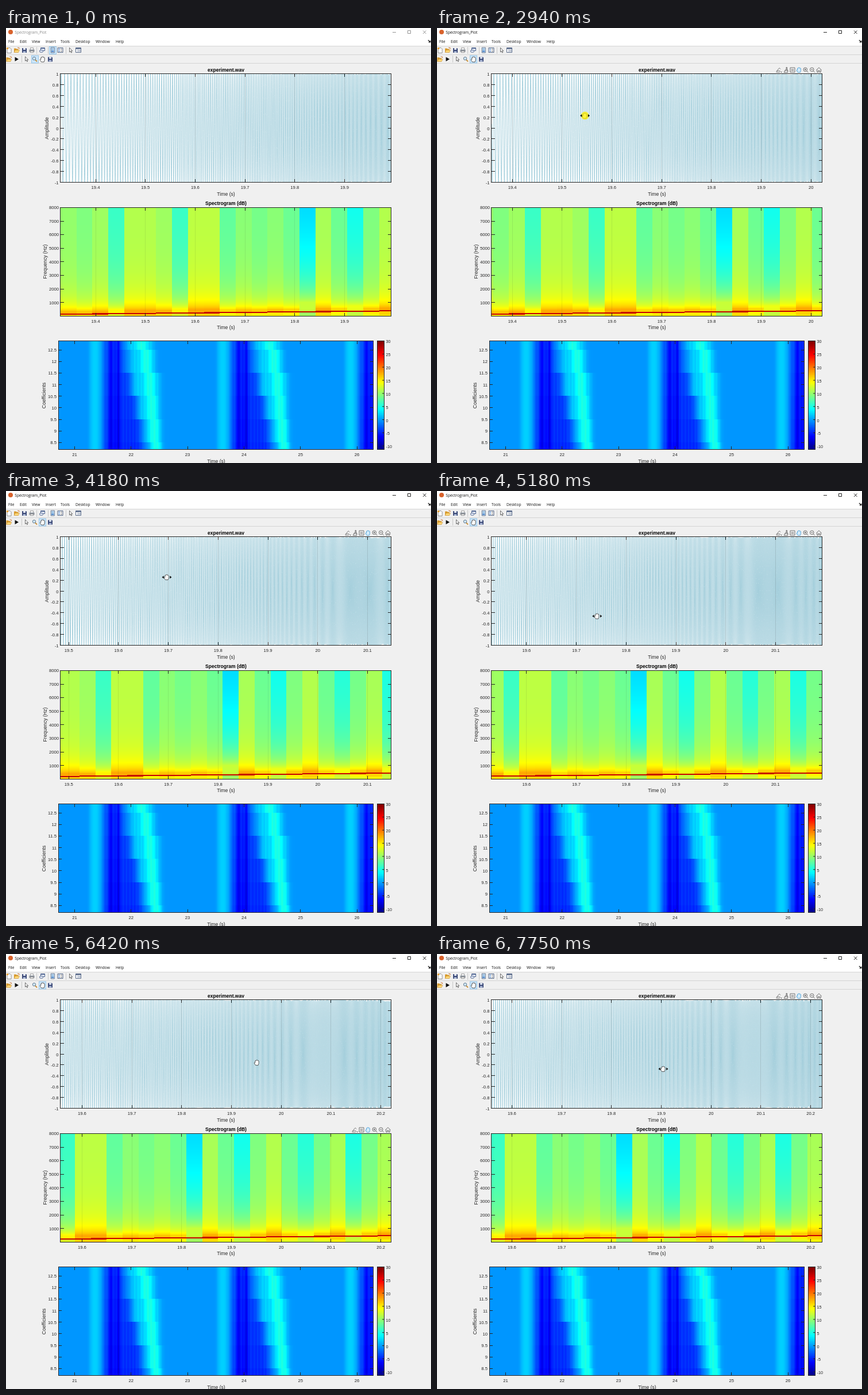
An HTML page with a canvas that plays this animation: 740 by 757 pixels, repeating every 8000 ms.

```html
<!DOCTYPE html>
<html lang="en">
<head>
<meta charset="utf-8">
<title>Spectrogram_Plot</title>
<style>
html, body { margin: 0; width: 100%; height: 100%; overflow: hidden; background: #f0f0f0; }
canvas, svg { position: absolute; left: 0; top: 0; width: 740px; height: 757px; }
.plot { font-family: "Liberation Sans", Arial, sans-serif; fill: #262626; }
.ui { font-family: "Open Sans", "Noto Sans", sans-serif; fill: #111; }
</style>
</head>
<body>
<canvas id="cv" width="740" height="757"></canvas>
<svg id="ui" viewBox="0 0 740 757" xmlns="http://www.w3.org/2000/svg">
  <defs>
    <g id="save"><path d="M-4-4H3L4-3V4H-4Z" fill="#3c4a78"/><path d="M-2-4H2V-1H-2Z" fill="#dfe6f5"/><path d="M-2.3 1.2H2.3V4H-2.3Z" fill="#aebbd8"/></g>
    <g id="folder"><path d="M-4.5 4V-3H-1L0-2H3V4Z" fill="#d99a2b"/><path d="M-4.5 4L-2.5 0H5L3 4Z" fill="#ffd877" stroke="#b9812a" stroke-width=".5"/><path d="M1.5-4.5L4.5-4V-2" fill="none" stroke="#c96a28" stroke-width=".9"/></g>
    <path id="arrow" d="M0 0V9.5L2.2 7.4 3.8 11 5.3 10.3 3.7 6.9H6.6Z" fill="#fff" stroke="#222" stroke-width=".8"/>
    <path id="hand" d="M-2.4 4.6L-4.8 .9Q-4.7-.6-3.2 .2V-3Q-2.4-4-1.7-3V-4Q-1-5-.2-4.1Q.6-5 1.4-4V-3Q2.4-4 3.1-2.8V1.6L2.1 4.6Z" fill="#fff" stroke="#333" stroke-width=".8"/>
    <g id="lens"><path d="M.8 .8L4 4" stroke="#c58a2e" stroke-width="1.8"/><circle cx="-1" cy="-1.2" r="2.7" fill="#cfe6f7" stroke="#5b7285" stroke-width=".9"/></g>
    <g id="magnify" fill="none" stroke="#606060" stroke-width=".9"><circle cx="-.7" cy="-.7" r="3.3"/><path d="M1.7 1.7L4.4 4.4M-2.4-.7H1"/></g>
    <g id="export" fill="none" stroke="#707070" stroke-width=".9"><path d="M-4 2.5L1-3.5 3.2-1.5M-4 2.5Q0-.5 3 2.5M-4.5 4H2"/><path d="M3.2 3H6L4.6 4.8Z" fill="#606060" stroke="none"/></g>
    <path id="brush" d="M.5-4.5H2V0H3.2V4.3H-3.2L-1.2 0H.5ZM-1.2 1H3" fill="none" stroke="#606060" stroke-width=".9"/>
    <path id="tip" d="M-4-4H4V4H-4ZM-2.3-1H2.3M-2.3 1.2H2.3" fill="none" stroke="#666" stroke-width=".9"/>
    <path id="home" d="M-4.6 .3L0-4.2 4.6 .3M-3.2-.6V4H-1V1H1V4H3.2V-.6" fill="none" stroke="#606060" stroke-width=".9"/>
    <g id="tools">
      <use href="#tip" x="619"/>
      <g transform="translate(630.5 0) scale(.92)"><path d="M-2.4 4.6L-4.8 .9Q-4.7-.6-3.2 .2V-3Q-2.4-4-1.7-3V-4Q-1-5-.2-4.1Q.6-5 1.4-4V-3Q2.4-4 3.1-2.8V1.6L2.1 4.6Z" fill="#d5ecfa" stroke="#3d9ad6" stroke-width=".9"/></g>
      <use href="#magnify" x="642"/><path d="M641.3-2.4V1" stroke="#606060" stroke-width=".9"/>
      <use href="#magnify" x="653.5"/><use href="#home" x="665"/>
    </g>
  </defs>

  <path d="M0 0H740V31H0Z" fill="#fff"/>
  <path d="M0 31.5H740M0 46.5H740M0 61.5H740" stroke="#d4d4d4"/>
  <path d="M53.5 33V45M73.5 33V45M104.5 33V45M27.5 48V60" stroke="#c8c8c8"/>
  <circle cx="8" cy="7" r="4" fill="#d8622c"/>
  <g id="caption">
    <text class="ui" id="name" x="15.3" y="9.6" font-size="6.7">Spectrogram_Plot</text>
    <path id="buttons" d="M673 7.5H679M699.5 4.5H704.5V9.5H699.5ZM726 4.5L731.5 10M731.5 4.5L726 10" fill="none" stroke-width=".9"/>
  </g>
  <path d="M735 21L738.5 24.5M738.8 21.8V24.8H735.6" fill="none" stroke="#111" stroke-width="1.1"/>
  <g fill="#cce6fa" stroke="#86bfe8" stroke-width=".8">
    <rect id="hlBar" x="75.5" y="32.5" width="12" height="13"/>
    <rect id="hlZoom" x="44.5" y="48" width="12" height="13"/>
    <rect id="hlHand" x="57.5" y="48" width="12" height="13"/>
  </g>

  <path d="M2-4H7L9-2V5H2Z" transform="translate(0 38.5)" fill="#fff" stroke="#777" stroke-width=".8"/>
  <circle cx="2.5" cy="35.5" r="1.8" fill="#e8a33a"/>
  <use href="#folder" x="18.5" y="38.5"/><use href="#save" x="32" y="39"/>
  <g transform="translate(45 38.5)"><path d="M-2.5-4H2.5V0H-2.5Z" fill="#fff" stroke="#777" stroke-width=".7"/><path d="M-4.5-1H4.5V3H-4.5Z" fill="#8c939c"/><path d="M-2.7 1.5H2.7V4.2H-2.7Z" fill="#eee" stroke="#666" stroke-width=".6"/></g>
  <g transform="translate(63 38.5)" fill="#e8eefa" stroke="#3e5584" stroke-width=".9"><path d="M-2.5-4H4.5V1H-2.5Z"/><path d="M-2.5-3H4.5"/><rect x="-4.5" y="0" width="6" height="3.6" rx="1.6"/></g>
  <g transform="translate(81.3 38.5)"><path d="M-3-4.5H3V4.5H-3Z" fill="#fff" stroke="#4c6485" stroke-width=".9"/><path d="M-2-3.5H2V3.5H-2Z" fill="#9dc4e6"/><path d="M-2 1H2V3.5H-2Z" fill="#5a8fd0"/></g>
  <g transform="translate(94.5 38.5)"><path d="M-4.5-4H4.5V4H-4.5Z" fill="#fff" stroke="#4c5f80"/><path d="M-3-1.7H-.7M-3 1.7H-.7" stroke="#2f6fc0" stroke-width="1.5"/><path d="M.5-1.7H3.3M.5 1.7H3.3" stroke="#555"/></g>
  <use href="#arrow" transform="translate(110.5 34.3) scale(.8)"/>
  <g transform="translate(126 38.5)"><path d="M-4.5-4H4.5V4H-4.5Z" fill="#fff" stroke="#4c5f80" stroke-width=".9"/><path d="M-4.5-4H4.5V-2H-4.5Z" fill="#4c5f80"/><path d="M-1-2V4M0 0H4M0 2H4" stroke="#7d8ca6" stroke-width=".8"/></g>
  <use href="#folder" x="5" y="54.3"/><path d="M15.5 50.5L22 54.3 15.5 58Z" fill="#111"/>
  <use href="#arrow" transform="translate(33.5 49.8) scale(.8)"/>
  <use href="#lens" x="50" y="54.3"/><use href="#hand" x="64" y="54.5"/><use href="#save" x="77" y="54.5"/>

  <g id="bar1" transform="translate(0 73)"><use href="#export" x="595"/><use href="#brush" x="607.5"/><use href="#tools"/></g>
  <g id="bar2" transform="translate(0 306)"><use href="#export" x="607"/><use href="#tools"/></g>
  <g id="labels"></g>
  <g id="cursor">
    <use id="point" href="#arrow"/>
    <use id="grab" href="#hand"/>
    <circle id="glow" r="7" fill="#fff200" fill-opacity=".75"/>
    <path id="sides" d="M-8.5 0L-5.2-2.5V2.5ZM8.5 0L5.2-2.5V2.5Z" fill="#111"/>
  </g>
</svg>
<script>
const $ = id => document.getElementById(id);
const ctx = $('cv').getContext('2d');
const LOOP = 8000, START = 19.3302, PX = 867, SPAN = 576 / PX;
const X0 = 95, X1 = 671, WAVE = 79, SPEC = 312, COEF = 544, H = 189;
const clamp = (v, a = 0, b = 1) => Math.max(a, Math.min(b, v));

function jet(v) {
  const part = c => Math.round(255 * clamp(1.5 - Math.abs(4 * v - c)));
  return `rgb(${part(3)},${part(2)},${part(1)})`;
}

function label(x, y, s, size = 7.7, anchor = 'middle', more = {}) {
  const e = document.createElementNS('http://www.w3.org/2000/svg', 'text');
  const at = { class: 'plot', x, y, 'font-size': size, 'text-anchor': anchor, ...more };
  for (const k in at) e.setAttribute(k, at[k]);
  e.textContent = s;
  $('labels').append(e);
  return e;
}

// Static text
const menu = { File: 4, Edit: 24, View: 45, Insert: 69, Tools: 95, Desktop: 121, Window: 156, Help: 191 };
for (const m in menu) label(menu[m], 26, m, 6.6, 'start', { class: 'ui' });
const bold = { 'font-weight': 'bold', style: 'fill:#000' };
label(383, 75.6, 'experiment.wav', 8.5, 'middle', bold);
label(383, 308, 'Spectrogram (dB)', 8.5, 'middle', bold);
for (const [x, y] of [[383, 291.5], [383, 524], [366, 756.5]]) label(x, y, 'Time (s)', 8.7);
const side = (x, y, s) => label(x, y, s, 8.7, 'middle', { transform: `rotate(-90 ${x} ${y})` });
side(74, 174.5, 'Amplitude');
side(70.5, 406.5, 'Frequency (Hz)');
side(68.5, 639.5, 'Coefficients');
for (let i = 0; i <= 10; i++) label(91.5, 83 + i * 18.9, String((5 - i) / 5), 7.7, 'end');
for (let i = 1; i <= 8; i++) label(92, 504.2 - i * 23.62, i * 1000, 7.7, 'end');
for (let i = 0; i <= 8; i++) label(88, 563 + i * 20.18, 12.5 - i / 2, 7.7, 'end');
for (let i = 0; i <= 5; i++) label(119.5 + i * 98.3, 745, 21 + i);
for (let i = 0; i <= 8; i++) label(661.5, 548.4 + i * 22.85, 30 - i * 5, 7.3, 'start');
const ticks = Array.from({ length: 8 }, () => [label(0, 280.3, ''), label(0, 512.8, '')]);

function line(x1, y1, x2, y2, color = '#262626') {
  ctx.strokeStyle = color;
  ctx.lineWidth = 1;
  ctx.beginPath();
  ctx.moveTo(x1, y1);
  ctx.lineTo(x2, y2);
  ctx.stroke();
}
function frame(x, y, w) {
  ctx.strokeStyle = '#262626';
  ctx.lineWidth = 1;
  ctx.strokeRect(x + .5, y + .5, w, H);
}

// Coefficient map, per row: end of the dark band; start, peak and end of the bright band
const rows = [[203, 212, 236, 256], [206, 218, 244, 260], [216, 222, 250, 268],
  [226, 232, 254, 268], [234, 242, 258, 270], [238, 250, 262, 270]];
const edges = [544, 560, 600, 640, 681, 721, 733];
const band = (x, a, b, s) => 1 / (1 + Math.exp((a - x) / s)) - 1 / (1 + Math.exp((b - x) / s));
function coef(x, [dark, a, peak, b], row) {
  if (x < 100) return .272;
  const u = (x - 100) % 222.5 + 100;
  const d = band(u, 170, dark, 3.5), c = band(u, a, b, 2.5);
  return .272 + .035 * band(u, 145, 168, 1.2) + .025 * band(u, 150, 161, 1.5)
    - (.08 + .006 * row) * d - .03 * band(u, 179, 199, 1)
    - .04 * (band(u, 180, 184, .6) + band(u, 194, 198, .6))
    + .06 * c + .07 * band(u, peak - 8, peak + 8, 2) + .01 * (c - d) * Math.sin(u * 1.1);
}
function drawLower() {
  rows.forEach((r, i) => {
    for (let x = 91; x < 639; x += 2) {
      ctx.fillStyle = jet(coef(x + 1, r, i));
      ctx.fillRect(x, edges[i], 2, edges[i + 1] - edges[i]);
    }
  });
  frame(91, COEF, 548);
  for (let i = 0; i <= 5; i++) {
    const x = Math.round(119 + i * 98.3) + .5;
    line(x, COEF, x, COEF + 6);
    line(x, COEF + H - 5, x, COEF + H);
  }
  for (let i = 0; i <= 8; i++) {
    const y = Math.round(559.5 + i * 20.18) + .5;
    line(91, y, 97, y);
    line(634, y, 640, y);
  }
  for (let i = 0; i < 63; i++) {
    ctx.fillStyle = jet(1 - i / 63);
    ctx.fillRect(647, COEF + i * 3, 12, 3);
  }
  frame(646, COEF, 12);
  for (let i = 1; i <= 8; i++) line(655, 544.5 + i * 22.85, 659, 544.5 + i * 22.85);
}

// Spectrogram: level at 8 kHz for each 32 ms window
const levels = [.52, .5, .53, .43, .55, .55, .53, .43, .56, .56, .47, .51, .49, .51, .48, .34,
  .54, .48, .39, .5, .55, .48, .41, .49, .54, .4, .49, .54];
const FIRST = 19.33, WIN = .032;
const pitch = tau => 150 + 375 * tau;
const spec = document.createElement('canvas');
spec.width = levels.length;
spec.height = H * 2;
const sc = spec.getContext('2d');
levels.forEach((top, i) => {
  const tone = pitch((i + .5) * WIN), low = Math.max(0, .54 - top);
  for (let y = 0; y < H * 2; y++) {
    const f = 8000 * (1 - (y + .5) / (H * 2)), d = Math.abs(f - tone);
    const L = Math.max(0, Math.log(8000 / (d + 150)));
    let v = top + .017 * L * L + 1.6 * low * low * L;
    v = Math.min(v, .71 - low * .7) - (f < tone ? .04 : 0);
    if (d < 46) v = .93;
    sc.fillStyle = jet(v);
    sc.fillRect(i, y, 1, 1);
  }
});

function drawAxes(left, y0, step, count, grid) {
  for (let n = Math.ceil(left * 10 - 1e-6); n / 10 <= left + SPAN; n++) {
    const x = Math.round(X0 + (n / 10 - left) * PX) + .5;
    line(x, y0, x, y0 + H, `rgba(38,38,38,${grid})`);
    line(x, y0, x, y0 + 6);
    line(x, y0 + H - 5, x, y0 + H);
  }
  for (let i = 0; i < count; i++) {
    const y = Math.round(y0 + i * step) + .5;
    line(X0, y, X0 + 6, y);
    line(X1 - 6, y, X1, y);
  }
  frame(X0 - 1, y0, X1 - X0);
}

function drawUpper(left) {
  ctx.fillStyle = '#f0f0f0';
  ctx.fillRect(X0 - 3, WAVE - 2, 582, 430);
  ctx.fillStyle = '#fff';
  ctx.fillRect(X0, WAVE, 576, H);
  ctx.save();
  ctx.beginPath();
  ctx.rect(X0, WAVE, 576, H);
  ctx.rect(X0, SPEC, 576, H + 1);
  ctx.clip();
  ctx.beginPath();
  for (let p = 0; p <= 576; p += .15) {
    const tau = left + p / PX - FIRST;
    ctx.lineTo(X0 + p, WAVE + 95 - 94.5 * Math.sin(2 * Math.PI * tau * (150 + 187.5 * tau)));
  }
  ctx.strokeStyle = 'rgb(155,202,216)';
  ctx.lineWidth = .9;
  ctx.stroke();
  ctx.imageSmoothingEnabled = false;
  ctx.drawImage(spec, X0 + (FIRST - left) * PX, SPEC + .5, levels.length * WIN * PX, H);
  ctx.restore();
  drawAxes(left, WAVE, 18.9, 11, .13);
  drawAxes(left, SPEC, 23.62, 8, .09);

  const n0 = Math.ceil(left * 10 - 1e-6);
  ticks.forEach((pair, i) => {
    const n = n0 + i, x = X0 + .5 + (n / 10 - left) * PX;
    for (const e of pair) {
      e.textContent = x <= X1 + 1 ? n / 10 : '';
      e.setAttribute('x', x.toFixed(2));
    }
  });
}

// Pointer path: time, x, y, button held until the next row
const path = [
  [70, 668, 757], [820, 61, 51], [1150, 61, 51], [1640, 275, 161], [1770, 319, 190], [1910, 319, 190],
  [2270, 282.5, 153], [2530, 282.5, 153, 1], [3530, 222, 152, 1], [3800, 149, 150], [4180, 280, 150],
  [4280, 280, 150, 1], [4950, 240, 151], [5040, 240, 151], [5380, 344, 330, 1], [5780, 331, 330, 1],
  [5960, 320.5, 329], [6420, 437, 189], [6770, 396, 200], [6830, 396, 200, 1], [7610, 394, 200], [LOOP, 394, 200]
];
function pointer(t) {
  let drag = 0;
  for (let i = 0; i < path.length - 1; i++) {
    const [ta, xa, ya, held] = path[i], [tb, xb, yb] = path[i + 1];
    if (t >= tb && i < path.length - 2) {
      if (held) drag += xa - xb;
      continue;
    }
    let k = clamp((t - ta) / (tb - ta));
    if (!held) k = k * k * (3 - 2 * k);
    const x = xa + (xb - xa) * k, y = ya + (yb - ya) * k;
    if (held) drag += xa - x;
    return { x, y, held, left: START + drag / PX };
  }
}

const show = (id, on) => { $(id).style.display = on ? '' : 'none'; };
let lastLeft;
function render(t) {
  const p = pointer(t), active = t >= 1000, pan = t >= 2000;
  if (p.left !== lastLeft) drawUpper(lastLeft = p.left);
  const bar1 = (t >= 2150 && t < 5200) || t >= 6650;
  const bar2 = t >= 5300 && t < 6600;
  show('bar1', bar1);
  show('bar2', bar2);
  show('hlBar', t < 2560);
  show('hlZoom', t < 1980);
  show('hlHand', active);
  $('name').style.fill = active ? '#111' : '#8a8a8a';
  $('buttons').setAttribute('stroke', active ? '#111' : '#8a8a8a');
  show('cursor', t >= 70);
  $('cursor').setAttribute('transform', `translate(${p.x.toFixed(2)} ${p.y.toFixed(2)})`);
  show('glow', p.held);
  show('point', !pan);
  show('grab', pan);
  show('sides', pan && bar1);
}

drawLower();
const begin = performance.now();
function tick() {
  render((performance.now() - begin) % LOOP);
  requestAnimationFrame(tick);
}
tick();
</script>
</body>
</html>
```
